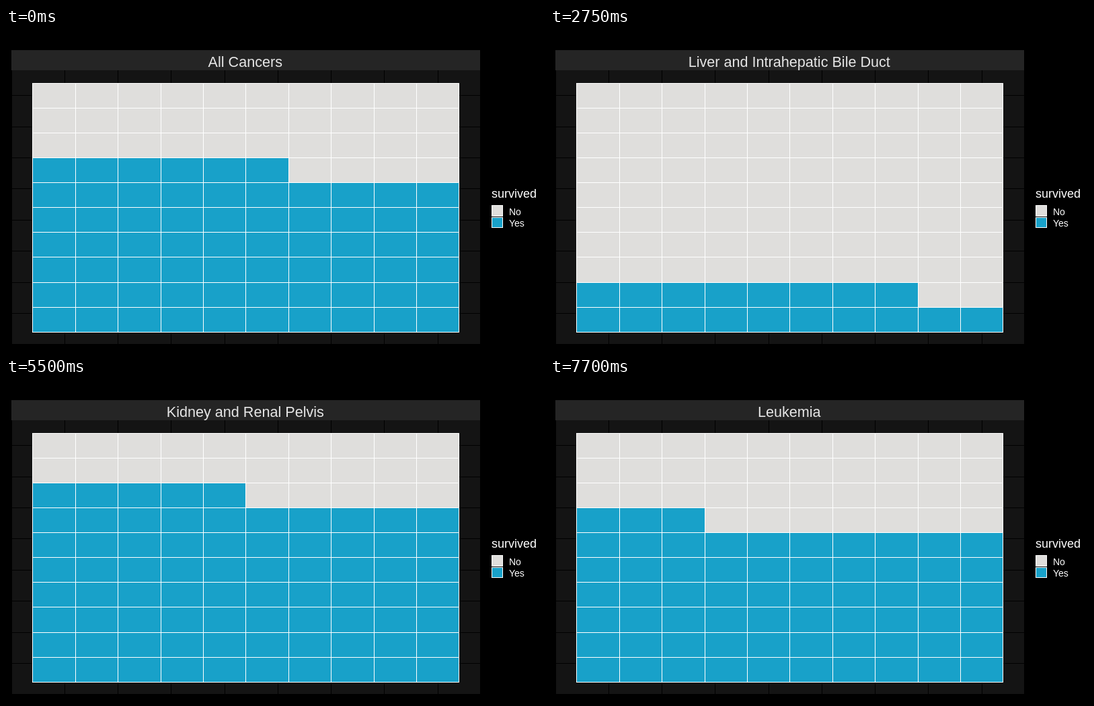
These frames come from a looping animation (800x480 px, 8000 ms). An HTML page with a canvas:

```html
<!DOCTYPE html>
<html lang="en">
<head>
<meta charset="utf-8">
<title>Cancer survival</title>
<style>
  html, body { margin: 0; width: 100%; height: 100%; overflow: hidden; background: #000; }
  canvas { display: block; }
</style>
</head>
<body>
<canvas id="stage" width="800" height="480"></canvas>
<script>
const ctx = document.getElementById('stage').getContext('2d');
const LOOP = 8000, STEP = 550;
const NO = '#dfdedc', YES = '#18a1c9';

// Site and survivors per hundred
const sites = [
  ['All Cancers', 66],
  ['Oral Cavity and Pharynx', 67],
  ['Esophagus', 20],
  ['Stomach', 31],
  ['Colon and Rectum', 66],
  ['Liver and Intrahepatic Bile Duct', 18],
  ['Pancreas', 8],
  ['Lung and Bronchus', 19],
  ['Melanoma of the Skin', 93],
  ['Urinary Bladder', 78],
  ['Kidney and Renal Pelvis', 75],
  ['Brain and Other Nervous System', 35],
  ['Non-Hodgkin Lymphoma', 73],
  ['Myeloma', 51],
  ['Leukemia', 63]
];

const colX = i => Math.round(39.3 + 63.4 * i);
const rowY = i => Math.round(81.52 + 37.13 * i);

function rect(color, x, y, w, h) {
  ctx.fillStyle = color;
  ctx.fillRect(x, y, w, h);
}

function text(str, x, y, size, color, align = 'left') {
  ctx.font = `${size}px "Liberation Sans", Arial, sans-serif`;
  ctx.textAlign = align;
  ctx.fillStyle = color;
  ctx.fillText(str, x, y);
}

function drawPanel() {
  rect('#000', 0, 0, 800, 480);
  rect('#252525', 8, 33, 697, 30);
  rect('#141414', 8, 63, 697, 408);
  for (let i = 0; i < 9; i++) rect('#000', Math.round(7.8 + 79.22 * i), 63, 1, 408);
  for (let i = 0; i < 8; i++) rect('#000', 8, Math.round(100.2 + 46.4 * i), 697, 1);
}

function drawWaffle(count) {
  const left = colX(0), top = rowY(0);
  const width = colX(10) - left + 1, height = rowY(10) - top + 1;
  rect(NO, left, top, width, height);
  for (let n = 0; n < count; n++) {
    const col = n % 10, row = 9 - Math.floor(n / 10);
    rect(YES, colX(col), rowY(row), colX(col + 1) - colX(col), rowY(row + 1) - rowY(row));
  }
  for (let i = 0; i <= 10; i++) {
    rect('#fff', colX(i), top, 1, height);
    rect('#fff', left, rowY(i), width, 1);
  }
}

function drawKey(label, color, y, h, baseline) {
  rect('#fff', 722, y, 17, h);
  rect(color, 723, y + 1, 15, h - 2);
  text(label, 748, baseline, 14, '#fff');
}

function draw(time) {
  const [name, count] = sites[Math.floor((time % LOOP) / STEP)];
  drawPanel();
  text(name, 355.8, 58, 21.6, '#e6e6e6', 'center');
  drawWaffle(count);
  text('survived', 722, 253, 18, '#fff');
  drawKey('No', NO, 264, 17, 279);
  drawKey('Yes', YES, 282, 16, 296);
}

const start = performance.now();
function tick() {
  draw(performance.now() - start);
  requestAnimationFrame(tick);
}
tick();
</script>
</body>
</html>
```
